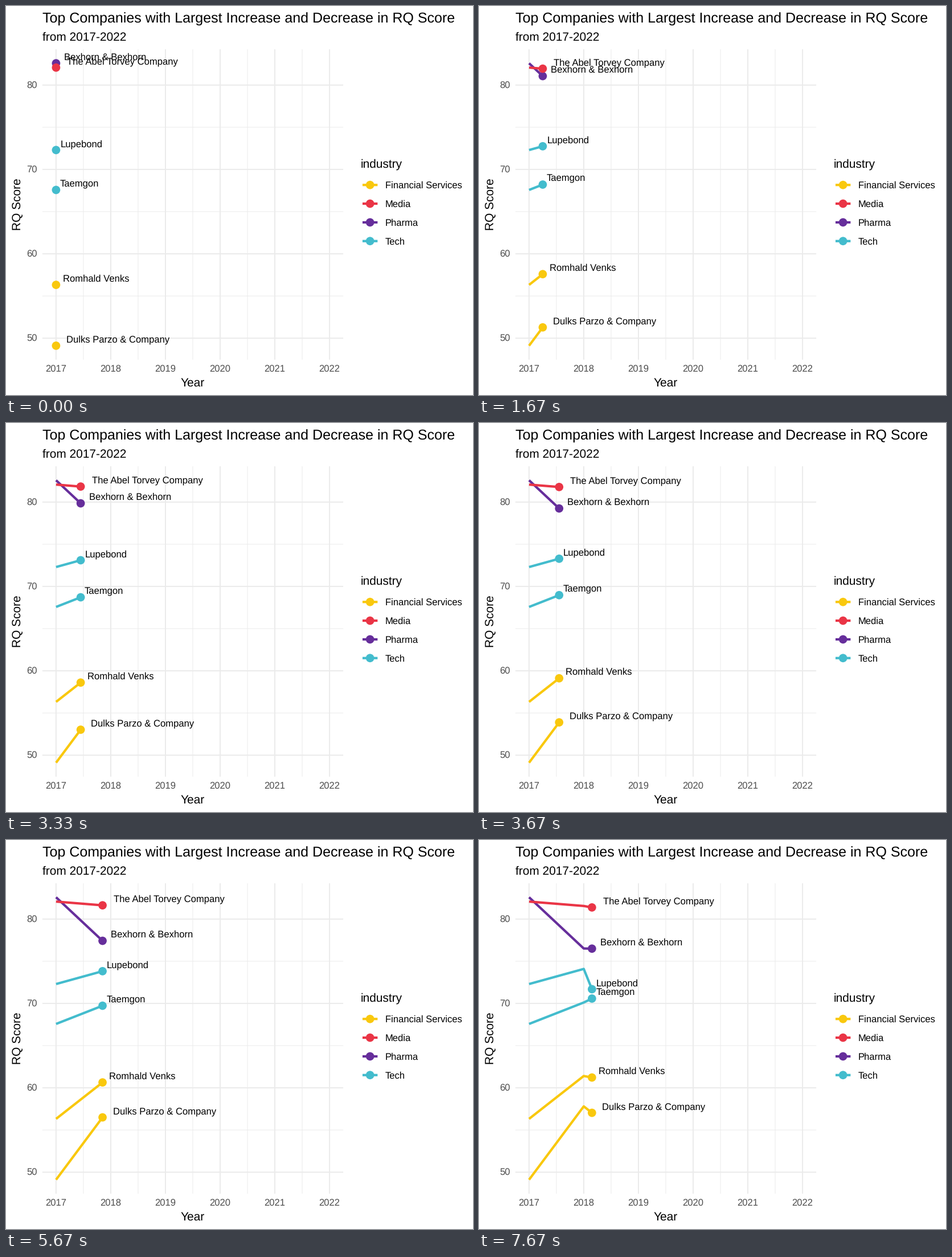
These frames come from a looping animation (820x683 px, 8000 ms). A matplotlib script:

```python
import matplotlib.pyplot as plt
from matplotlib.animation import FuncAnimation
from matplotlib.patches import Circle

WIDTH, HEIGHT, DPI = 820, 683, 100
FRAMES, LOOP_MS = 24, 8000
STEPS_PER_YEAR = 20
LEFT, RIGHT, TOP, BOTTOM = 63.9, 592.1, 76, 621
DOT_RADIUS, LINE_WIDTH = 7.35, 4.2
GRID, GREY = "#EBEBEB", "#4D4D4D"

COLORS = {
    "Financial Services": "#F9C80E",
    "Media": "#EA3546",
    "Pharma": "#662E9B",
    "Tech": "#43BCCD",
}

# name, industry, scores for 2017, 2018 and 2019
COMPANIES = [
    ("Romhald Venks", "Financial Services", (56.32, 61.40, 60.20)),
    ("Dulks Parzo & Company", "Financial Services", (49.11, 57.80, 52.71)),
    ("Bexhorn & Bexhorn", "Pharma", (82.58, 76.51, 76.40)),
    ("The Abel Torvey Company", "Media", (82.07, 81.55, 80.40)),
    ("Lupebond", "Tech", (72.30, 74.09, 58.07)),
    ("Taemgon", "Tech", (67.57, 70.11, 73.22)),
]

plt.rcParams["font.family"] = "Liberation Sans"
plt.rcParams["text.hinting"] = "none"

# The tiny margin keeps float rounding from dropping a pixel.
size_inches = [(side + 1e-6) / DPI for side in (WIDTH, HEIGHT)]
fig = plt.figure(figsize=size_inches, dpi=DPI, facecolor="white")
ax = fig.add_axes([0, 0, 1, 1])
ax.set_xlim(0, WIDTH)
ax.set_ylim(HEIGHT, 0)
ax.axis("off")


def x_of(year):
    return 87.9 + (year - 2017) * 96.03


def y_of(score):
    return 138.8 + (80 - score) * 14.815


def line(xs, ys, color, width, zorder):
    return ax.plot(xs, ys, color=color, lw=width * 72 / DPI, zorder=zorder,
                   solid_capstyle="butt", solid_joinstyle="round", snap=False)[0]


def dot(x, y, color):
    return ax.add_patch(Circle((x, y), DOT_RADIUS, fc=color, lw=0, zorder=3))


def text(x, y, label, size, color="black", ha="left", **style):
    return ax.text(x, y, label, fontsize=size, color=color, ha=ha,
                   va="baseline", zorder=4, **style)


def draw_grid():
    for half in range(11):
        x = x_of(2017 + half / 2)
        minor = half % 2
        line([x, x], [TOP, BOTTOM], GRID, 1 if minor else 2, 1 - 0.5 * minor)
    for score in range(50, 85, 5):
        y = y_of(score)
        minor = score % 10 != 0
        line([LEFT, RIGHT], [y, y], GRID, 1 if minor else 2, 1 - 0.5 * minor)


def draw_labels():
    text(LEFT, 28.8, "Top Companies with Largest Increase and Decrease in RQ Score", 18)
    text(LEFT, 60.4, "from 2017-2022", 15)
    for year in range(2017, 2023):
        text(x_of(year), 643, str(year), 12, GREY, "center")
    for score in range(50, 90, 10):
        text(54.5, y_of(score) + 6, str(score), 12, GREY, "right")
    text((LEFT + RIGHT) / 2, 667.8, "Year", 15, ha="center")
    text(25.6, (TOP + BOTTOM) / 2, "RQ Score", 15, ha="center",
         rotation=90, rotation_mode="anchor")


def draw_legend():
    text(622.6, 284, "industry", 15)
    for row, (industry, color) in enumerate(COLORS.items()):
        y = 314.2 + 32.85 * row
        line([626, 652.4], [y, y], color, LINE_WIDTH, 2)
        dot(639.2, y, color)
        text(665.6, y + 6, industry, 12)


class Company:
    def __init__(self, name, industry, scores):
        color = COLORS[industry]
        self.scores = scores
        self.trail = line([], [], color, LINE_WIDTH, 2)
        self.head = dot(0, 0, color)
        self.label = text(0, 0, name, 11.95)
        self.shift = 0.1 * self.label.get_window_extent().width

    def move(self, elapsed):
        year = int(elapsed)
        start, end = self.scores[year:year + 2]
        score = start + (end - start) * (elapsed - year)
        x, y = x_of(2017 + elapsed), y_of(score)
        past = range(year + 1)
        self.trail.set_data([x_of(2017 + k) for k in past] + [x],
                            [y_of(self.scores[k]) for k in past] + [y])
        self.head.center = (x, y)
        self.label.set_position((x + self.shift, y - 5.9))
        return [self.trail, self.head, self.label]


draw_grid()
draw_labels()
draw_legend()
companies = [Company(*row) for row in COMPANIES]


def update(frame):
    elapsed = frame / STEPS_PER_YEAR
    return [artist for company in companies for artist in company.move(elapsed)]


anim = FuncAnimation(fig, update, frames=FRAMES, interval=LOOP_MS / FRAMES,
                     init_func=lambda: update(0), repeat=True, repeat_delay=0)
plt.show()
```
